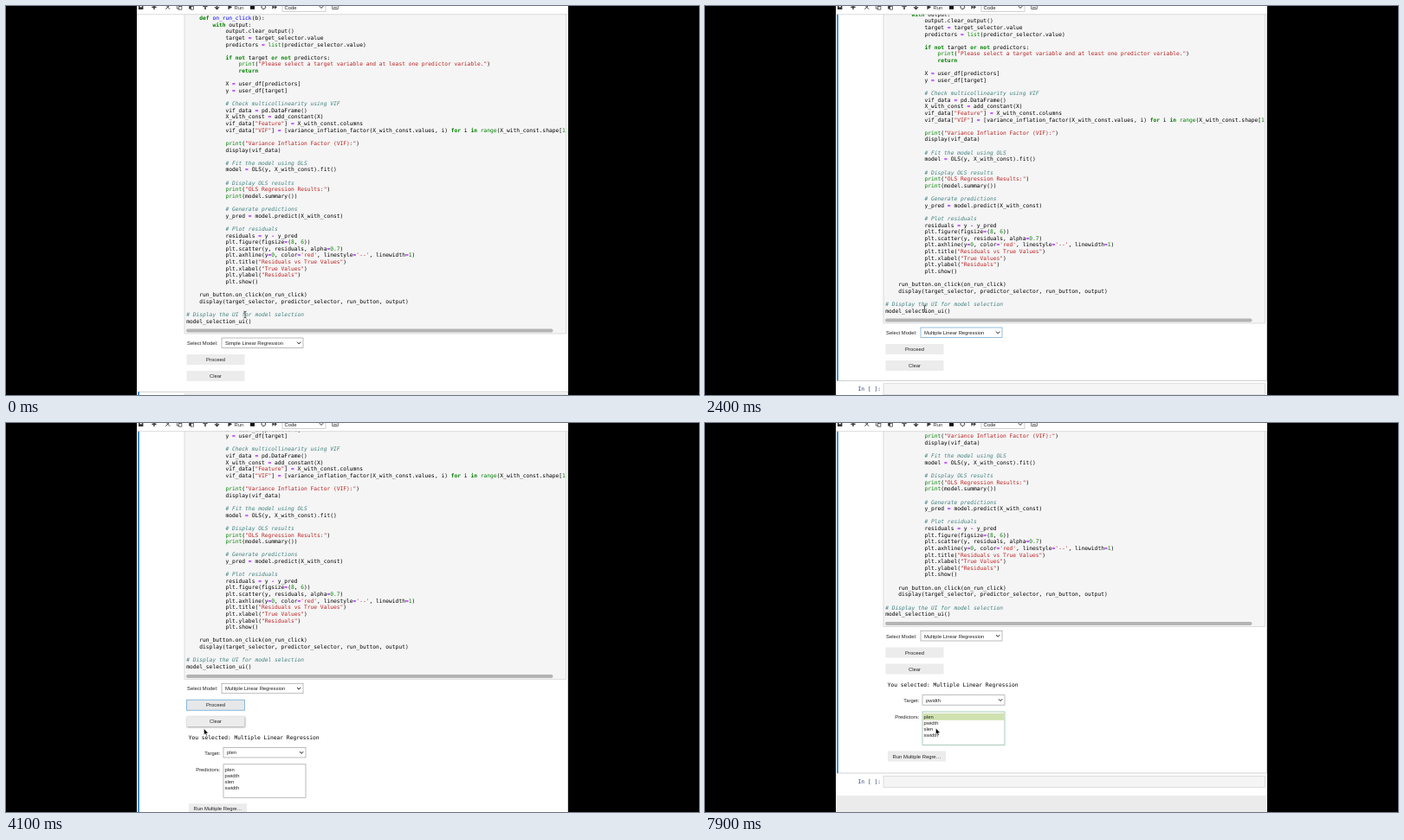
Animation of 800x450 px, one loop 8000 ms. Source, as an HTML page with a canvas:

```html
<!DOCTYPE html>
<html lang="en">
<head>
<meta charset="utf-8">
<style>
html, body { margin: 0; width: 100%; height: 100%; overflow: hidden; background: #000; }
canvas { display: block; }
</style>
</head>
<body>
<canvas id="stage" width="800" height="450"></canvas>
<script>
const ctx = document.getElementById('stage').getContext('2d');
const LOOP = 8000;
const MONO = '"DejaVu Sans Mono", monospace';
const SANS = '5.85px "Liberation Sans", Arial, sans-serif';
const CODE_SIZE = 6.27, LINE = 7.62;

const code = `    def on_run_click(b):
        with output:
            output.clear_output()
            target = target_selector.value
            predictors = list(predictor_selector.value)

            if not target or not predictors:
                print("Please select a target variable and at least one predictor variable.")
                return

            X = user_df[predictors]
            y = user_df[target]

            # Check multicollinearity using VIF
            vif_data = pd.DataFrame()
            X_with_const = add_constant(X)
            vif_data["Feature"] = X_with_const.columns
            vif_data["VIF"] = [variance_inflation_factor(X_with_const.values, i) for i in range(X_with_const.shape[1])]

            print("Variance Inflation Factor (VIF):")
            display(vif_data)

            # Fit the model using OLS
            model = OLS(y, X_with_const).fit()

            # Display OLS results
            print("OLS Regression Results:")
            print(model.summary())

            # Generate predictions
            y_pred = model.predict(X_with_const)

            # Plot residuals
            residuals = y - y_pred
            plt.figure(figsize=(8, 6))
            plt.scatter(y, residuals, alpha=0.7)
            plt.axhline(y=0, color='red', linestyle='--', linewidth=1)
            plt.title("Residuals vs True Values")
            plt.xlabel("True Values")
            plt.ylabel("Residuals")
            plt.show()

    run_button.on_click(on_run_click)
    display(target_selector, predictor_selector, run_button, output)

# Display the UI for model selection
model_selection_ui()`.split('\n');

// Syntax rules: pattern, colour, font style
const rules = [
  [/^#.*/, '#408080', 'italic '],
  [/^("[^"]*"|'[^']*')/, '#ba2121', ''],
  [/^(def|with|if|not|or|return|for|in)\b/, '#008000', 'bold '],
  [/^(print|list|range)\b/, '#008000', ''],
  [/^on_run_click(?=\(b)/, '#0000ff', ''],
  [/^\d+(\.\d+)?/, '#008800', ''],
  [/^[=-]/, '#aa22ff', 'bold '],
  [/^(\w+|\s+|.)/, '#000', '']
];

function tokenize(line) {
  const tokens = [];
  for (let col = 0; col < line.length;) {
    const rest = line.slice(col);
    const [pattern, color, style] = rules.find(r => r[0].test(rest));
    const text = rest.match(pattern)[0];
    tokens.push({ text, color, style, col });
    col += text.length;
  }
  return tokens;
}
const tokenLines = code.map(tokenize);

function text(s, x, y, color = '#222', font = SANS, align = 'left') {
  ctx.font = font;
  ctx.fillStyle = color;
  ctx.textAlign = align;
  ctx.fillText(s, x, y);
}

function rect(x, y, w, h, fill, stroke, lw = 0.7) {
  ctx.fillStyle = fill;
  ctx.fillRect(x, y, w, h);
  if (stroke) {
    ctx.strokeStyle = stroke;
    ctx.lineWidth = lw;
    ctx.strokeRect(x, y, w, h);
  }
}

function path(points, color, lw = 1, fill) {
  ctx.beginPath();
  for (let i = 0; i < points.length; i += 2) ctx.lineTo(points[i], points[i + 1]);
  if (fill) {
    ctx.closePath();
    ctx.fillStyle = fill;
    ctx.fill();
  }
  ctx.strokeStyle = color;
  ctx.lineWidth = lw;
  ctx.stroke();
}

function button(label, x, y, focused, hovered) {
  ctx.save();
  if (hovered) {
    ctx.shadowColor = 'rgba(0,0,0,.45)';
    ctx.shadowBlur = 2;
    ctx.shadowOffsetY = 1;
  }
  rect(x, y, 67, 12, '#ececec');
  ctx.restore();
  if (focused) rect(x, y, 67, 12, '#e6e8ea', '#7fb2d9', 0.9);
  text(label, x + 33.5, y + 8.1, '#222', SANS, 'center');
}

function select(label, x, y, w, focused) {
  rect(x, y, w, 11.5, '#fff', focused ? '#64a5d6' : '#9e9e9e');
  text(label, x + 4, y + 8);
  path([x + w - 7, y + 4.6, x + w - 4.9, y + 6.9, x + w - 2.8, y + 4.6], '#222', 1);
}

function drawCode() {
  rect(206, -30, 440.5, 409, '#f5f5f5', '#cfcfcf');
  ctx.save();
  ctx.beginPath();
  ctx.rect(206, -30, 440.5, 409);
  ctx.clip();
  ctx.font = `${CODE_SIZE}px ${MONO}`;
  const charW = ctx.measureText('0').width;
  tokenLines.forEach((tokens, i) => {
    for (const t of tokens)
      text(t.text, 208.2 + t.col * charW, 16.1 + i * LINE, t.color, `${t.style}${CODE_SIZE}px ${MONO}`);
  });
  ctx.restore();
  ctx.fillStyle = '#b4b4b4';
  ctx.beginPath();
  ctx.roundRect(208, 373.6, 423.5, 4, 2);
  ctx.fill();
}

function drawOutput(t) {
  text('You selected: Multiple Linear Regression', 210.7, 448.8, '#000', `${CODE_SIZE}px ${MONO}`);
  text('Target:', 247.2, 466.4, '#222', SANS, 'right');
  select(t < 5700 ? 'plen' : 'pwidth', 251, 458.2, 95, t >= 5200 && t < 6350);
  text('Predictors:', 247.2, 485.6, '#222', SANS, 'right');
  rect(251, 477.5, 95, 38.5, '#fff', t >= 6250 ? '#86b89a' : '#9e9e9e');
  if (t >= 6400) rect(251.5, 479.3, 94, 8, '#d0e2b0');
  ['plen', 'pwidth', 'slen', 'swidth'].forEach((name, i) => {
    const pressed = i === 0 && t >= 6250 && t < 6400;
    text(name, 252.6, 485.5 + i * 7.1, pressed ? '#3f8a3f' : '#222');
  });
  button('Run Multiple Regre…', 211, 523, false, false);
}

function drawNotebook(t) {
  const ran = t >= 3300, active = t >= 700;
  const end = ran ? 548.5 : 445.5;
  rect(151, end + 26, 498, 300, '#ebebeb');
  drawCode();

  text('Select Model:', 209, 392.1);
  select(t < 1500 ? 'Simple Linear Regression' : 'Multiple Linear Regression',
    249, 384, 94, active && !ran);
  button('Proceed', 208.5, 403, ran && t < 5200, t >= 2700 && t < 3600);
  button('Clear', 208.5, 422, false, t >= 3650 && t < 4150);
  if (ran) drawOutput(t);

  rect(206, end + 3.3, 440.5, 13, '#f5f5f5', '#cfcfcf');
  text('In [ ]:', 203, end + 12, '#303f6f', `${CODE_SIZE}px ${MONO}`, 'right');

  // Outline and marker of the selected cell
  const top = active ? -30 : end + 0.8;
  const bottom = active ? end : end + 19;
  ctx.strokeStyle = '#bdbdbd';
  ctx.lineWidth = 0.7;
  ctx.strokeRect(152.4, top, 496.2, bottom - top);
  rect(152, top, 2, bottom - top, '#4291dc');
}

function drawToolbar() {
  rect(151, 0, 498, 9.3, '#fff');
  rect(151, 9.3, 498, 0.9, '#d8d8d8');
  const ink = '#333';
  rect(153, 0, 5.4, 4, ink);
  rect(154.6, 0, 2.2, 1.3, '#fff');
  path([171, -1, 171, 4], ink, 1.4);
  path([168.4, 1.3, 173.6, 1.3], ink, 1.4);
  path([184.5, 3.6, 189, -1], ink);
  path([184.5, -1, 189, 3.6], ink);
  rect(197.5, -1, 3.2, 4, '#fff', ink);
  rect(199.5, 0.5, 3.4, 3.6, '#fff', ink);
  rect(211.2, -1, 3.2, 4.5, ink);
  rect(213.5, 0.5, 3, 3.6, '#fff', ink);
  path([230, -1, 230, 4], ink, 1.5);
  path([227.6, 1, 230, -1.5, 232.4, 1], ink, 1.2);
  path([243.5, -1, 243.5, 3.5], ink, 1.5);
  path([241, 1.2, 243.5, 3.7, 246, 1.2], ink, 1.2);
  path([256.5, -1.5, 256.5, 4, 261, 1.3], ink, 0.2, ink);
  text('Run', 263.5, 3.9, ink);
  rect(282, -1, 5, 4.8, '#111');
  ctx.beginPath();
  ctx.arc(297.3, 1.2, 2.3, -0.6, 4.6);
  ctx.strokeStyle = ink;
  ctx.lineWidth = 1;
  ctx.stroke();
  path([307.5, -1, 307.5, 3.6, 310, 1.3], ink, 0.2, ink);
  path([310.2, -1, 310.2, 3.6, 312.8, 1.3], ink, 0.2, ink);
  rect(319, -5, 50, 11.3, '#fff', '#bbb');
  text('Code', 321.5, 4.4);
  path([361.8, 0.2, 364, 2.5, 366.2, 0.2], ink, 1);
  rect(376.8, -1, 6.4, 4.4, '#fff', ink);
  path([378, 1.7, 382, 1.7], ink, 0.8);
}

const cursors = {
  ibeam(x, y) {
    path([x, y - 3.6, x, y + 3.6], '#333', 0.8);
    path([x - 1.7, y - 4, x, y - 3.3, x + 1.7, y - 4], '#333', 0.7);
    path([x - 1.7, y + 4, x, y + 3.3, x + 1.7, y + 4], '#333', 0.7);
  },
  arrow(x, y) {
    path([x - 0.6, y - 4, x - 0.6, y + 3.2, x + 1, y + 1.8, x + 2.1, y + 4.3,
      x + 3.3, y + 3.7, x + 2.2, y + 1.4, x + 4.4, y + 1.2], '#fff', 0.5, '#000');
  },
  hand(x, y) {
    path([x - 1.8, y - 3.8, x - 0.8, y - 4.2, x, y - 3.4, x + 0.3, y - 0.9, x + 3.2, y - 0.2,
      x + 4, y + 1.2, x + 3.2, y + 4.6, x - 0.9, y + 4.6, x - 3.2, y + 1.4,
      x - 2.5, y + 0.5, x - 1.1, y + 1.4], '#222', 0.9, '#fff');
  }
};

// Pointer stops: time, x, y, shape
const stops = [
  [0, 276, 357, 'ibeam'], [300, 278, 362, 'ibeam'], [600, 296, 389, 'arrow'],
  [1100, 296, 390, 'arrow'], [1400, 290, 396, 'arrow'], [1700, 286, 394, 'arrow'],
  [1900, 270, 378, 'ibeam'], [2200, 258, 366, 'ibeam'], [2500, 252, 345, 'hand'],
  [2900, 250, 337, 'hand'], [3400, 250, 337, 'hand'], [3800, 228, 359, 'hand'],
  [4000, 228, 359, 'arrow'], [4500, 238, 345, 'arrow'], [4950, 266.8, 323, 'arrow'],
  [5300, 266.8, 323, 'arrow'], [5700, 268, 329, 'arrow'], [6200, 278.5, 346, 'arrow'],
  [6500, 278.5, 346, 'arrow'], [7100, 268, 355, 'arrow'], [7500, 267, 357, 'arrow'],
  [LOOP, 267, 357, 'arrow']
];

function ease(t, from, to) {
  const p = Math.min(1, Math.max(0, (t - from) / (to - from)));
  return p * p * (3 - 2 * p);
}

function drawCursor(t) {
  const i = stops.findIndex(s => s[0] > t) - 1;
  const a = stops[i], b = stops[i + 1];
  const p = ease(t, a[0], b[0]);
  cursors[a[3]](a[1] + (b[1] - a[1]) * p, a[2] + (b[2] - a[2]) * p);
}

function draw(now) {
  const t = now % LOOP;
  const scroll = 75.5 * ease(t, 2300, 2700) + 68 * ease(t, 4000, 4500);
  rect(0, 0, 800, 450, '#000');
  ctx.save();
  ctx.beginPath();
  ctx.rect(151, 0, 498, 450);
  ctx.clip();
  rect(151, 0, 498, 450, '#fff');
  ctx.save();
  ctx.translate(0, -scroll);
  drawNotebook(t);
  ctx.restore();
  drawToolbar();
  drawCursor(t);
  ctx.restore();
}

const start = performance.now();
function frame() {
  draw(performance.now() - start);
  requestAnimationFrame(frame);
}
frame();
</script>
</body>
</html>
```
